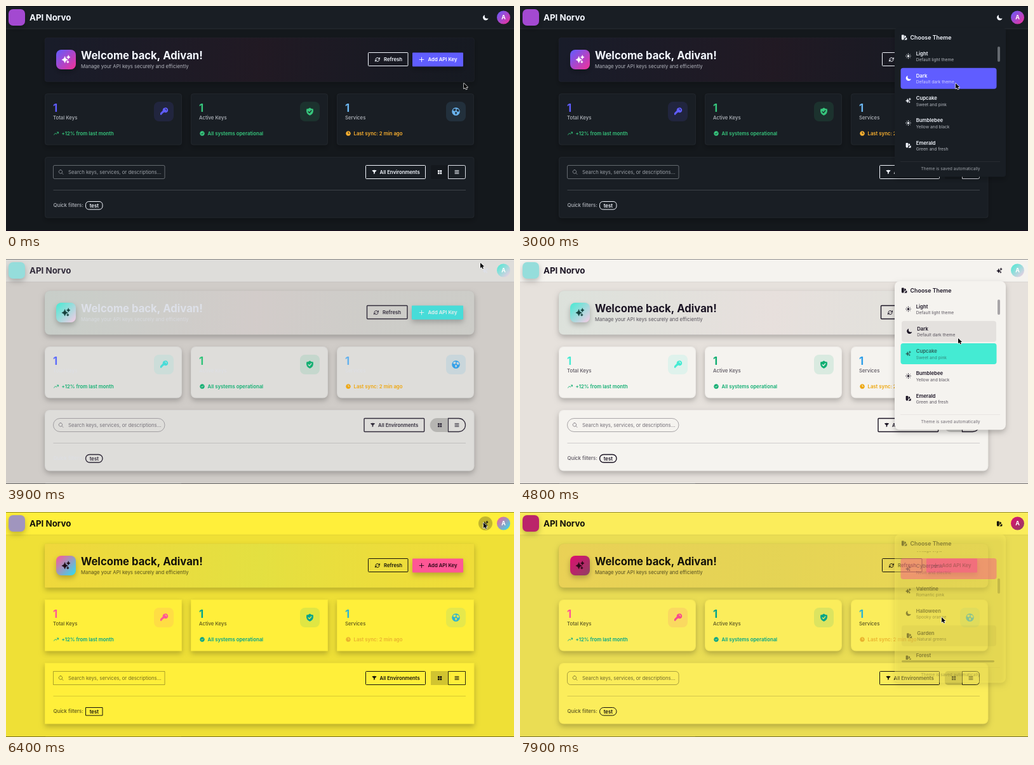
These frames come from a looping animation (800x355 px, 8 s). An HTML page with a canvas:

```html
<!DOCTYPE html>
<html lang="en">
<head>
<meta charset="utf-8">
<title>Key dashboard</title>
<style>
html, body { margin: 0; width: 100%; height: 100%; overflow: hidden; background: #14181c; }
canvas { display: block; width: 800px; height: 355px; }
</style>
</head>
<body>
<canvas id="stage"></canvas>
<script>
const W = 800, H = 355, LOOP = 8000, STEP = 100;
const canvas = document.getElementById('stage');
const dpr = window.devicePixelRatio || 1;
canvas.width = W * dpr;
canvas.height = H * dpr;
const g = canvas.getContext('2d');

// Font sizes: CSS pixels of a 1440 px wide page shown at 800 px
const XS = 12 / 1.8, SM = 14 / 1.8, MD = 16 / 1.8, XL = 24 / 1.8, XXL = 30 / 1.8;

const themes = [
  { start: 0, bg: '14181c', card: '191e24', ink: 'f4f8ff', pri: '605dff', sec: 'f43098', ok: '36c57c',
    info: '6ab4ee', warn: 'fcb12f', onPri: 'ffffff', onTile: 'ffffff', r: 4, field: 2, badge: 5, line: 1, icon: 'moon' },
  { start: 3500, bg: 'e6e1dc', card: 'f5f3ef', ink: '1b1424', pri: '44ebd3', sec: 'f9cbe5', ok: '10ae72',
    info: '2f9fe8', warn: 'eda60c', onPri: '2c5f5a', onTile: '14403c', r: 8, field: 11, badge: 6.5, line: 1.4, icon: 'sparkles' },
  { start: 5600, bg: 'efe036', card: 'ffef3a', ink: '14120a', pri: 'ff5795', sec: '2ce0f0', ok: '00a48c',
    info: '2fb5cf', warn: 'e9b22f', onPri: '2a0616', onTile: '1c0a12', r: 1, field: 0, badge: 0, line: 1, icon: 'sparkles' },
  { start: 7760, bg: 'd4d2d2', card: 'e9e7e7', ink: '100f0f', pri: 'e00d70', sec: '8e4162', ok: '00a87a',
    info: '4fb4d0', warn: 'e9b22f', onPri: 'ffffff', onTile: '2a0816', r: 8, field: 5, badge: 6.5, line: 1, icon: 'swatch' }
];

const menus = [
  { open: 2250, close: 3500, active: 1, scroll: [0, 1, 0] },
  { open: 4450, close: 5600, active: 2, scroll: [4800, 5400, 185] },
  { open: 6600, close: 7760, active: 8, scroll: [6950, 7550, 271] }
];

const options = [
  ['Light', 'Default light theme', 'sun'],
  ['Dark', 'Default dark theme', 'moon'],
  ['Cupcake', 'Sweet and pink', 'sparkles'],
  ['Bumblebee', 'Yellow and black', 'sun'],
  ['Emerald', 'Green and fresh', 'swatch'],
  ['Corporate', 'Professional blue', 'swatch'],
  ['Synthwave', 'Retro neon vibes', 'sparkles'],
  ['Retro', 'Vintage style', 'swatch'],
  ['Cyberpunk', 'Neon and electric', 'sparkles'],
  ['Valentine', 'Romantic pink', 'sparkles'],
  ['Halloween', 'Spooky orange', 'moon'],
  ['Garden', 'Natural greens', 'swatch'],
  ['Forest', 'Deep greens', 'swatch']
];

// Pointer path: time, x, y
const path = [
  [0, 721, 122], [200, 721, 122], [600, 727, 104], [800, 727, 104], [1700, 753, 20], [2250, 753, 20],
  [2600, 705, 80], [3000, 686, 122], [3350, 670, 148], [3500, 670, 148], [3900, 747, 6], [4150, 752, 16],
  [4450, 752, 17], [4800, 690, 125], [5300, 680, 172], [5600, 680, 172], [5700, 684, 132], [6200, 750, 20],
  [6400, 752, 17], [6600, 752, 17], [6900, 690, 120], [7400, 668, 190], [7760, 664, 190], [7900, 664, 166], [8000, 670, 150]
];

// 24-unit icons; s = stroke width, f = filled
const icons = {
  moon: { f: 1, d: 'M9.5 1.7a.75.75 0 0 1 .2.8A9 9 0 0 0 9 6a9 9 0 0 0 9 9 9 9 0 0 0 3.5-.7.75.75 0 0 1 1 1A10.5 10.5 0 1 1 8.7 1.6a.75.75 0 0 1 .8.1Z' },
  sparkles: { f: 1, d: 'M9 4.5Q10 11 16.5 12.5Q10 14 9 20.5Q8 14 1.5 12.5Q8 11 9 4.5M18 1.5Q18.7 5.3 22.5 6Q18.7 6.7 18 10.5Q17.3 6.7 13.5 6Q17.3 5.3 18 1.5M16.5 15Q17 17.5 19.5 18Q17 18.5 16.5 21Q16 18.5 13.5 18Q16 17.5 16.5 15Z', s: 1 },
  sun: { f: 1, s: 2.2, d: 'M12 8.5a3.5 3.5 0 1 0 .01 0M12 2v2.5M12 19.5v2.5M2 12h2.5M19.5 12h2.5M5 5l1.6 1.6M17.4 17.4l1.6 1.6M5 19l1.6-1.6M17.4 6.6l1.6-1.6' },
  swatch: { f: 1, d: 'M2.2 4.1a1.9 1.9 0 0 1 1.9-1.9h5.2a1.9 1.9 0 0 1 1.9 1.9v13.1a4.5 4.5 0 1 1-9 0ZM12.8 20.8l8-8a1.9 1.9 0 0 1 1.7 1.9v5.2a1.9 1.9 0 0 1-1.9 1.9H12ZM12.8 6.2l.8-.8a1.9 1.9 0 0 1 2.6 0l2.6 2.6a1.9 1.9 0 0 1 0 2.6l-6 6Z' },
  shield: { f: 1, d: 'M12 1.5Q16 5 21 5Q23.5 18 12 22.5Q.5 18 3 5Q8 5 12 1.5Z' },
  check: { s: 2.4, d: 'M8 12.5l3 3L16 9.5' },
  key: { f: 1, d: 'M15.7 1.5a6.8 6.8 0 0 0-6.6 8L2.5 16.2V21H6.5V18.5H9V16h2l2-2.1A6.8 6.8 0 1 0 15.7 1.5Z' },
  bow: { s: 1.8, d: 'M15.8 5a3.3 3.3 0 0 1 3.3 3.3' },
  disc: { f: 1, d: 'M12 2a10 10 0 1 0 .01 0Z' },
  land: { f: 1, d: 'M6 5L11 4L12 8L9 11L6 10L4 8ZM14 5L19 6L21 11L17 13L14 10ZM10 13L15 14L14 18L12 20L10 17Z' },
  hands: { s: 2.4, d: 'M12 6.5V12H16' },
  trend: { s: 2.6, d: 'M2 18L9 11L13 15L21.5 7M16 6.5H22V12' },
  refresh: { s: 2.6, d: 'M4 10A8.5 8.5 0 0 1 19 7.5L21 10M21 4V10H15M20 14A8.5 8.5 0 0 1 5 16.5L3 14M3 20V14H9' },
  plus: { s: 2.4, d: 'M12 3V21M3 12H21' },
  funnel: { f: 1, d: 'M2 3.5Q12 1.5 22 3.5V6L14.5 13V18.5L9.5 22V13L2 6Z' },
  grid: { f: 1, d: 'M3 3h8v8H3ZM13.5 3h8v8h-8ZM3 13.5h8v8H3ZM13.5 13.5h8v8h-8Z' },
  list: { s: 2.4, d: 'M3 4.5H21M3 9.5H21M3 14.5H21M3 19.5H21' },
  search: { s: 2, d: 'M10.5 3a7.5 7.5 0 1 0 .01 0M16 16L21.5 21.5' }
};
for (const k in icons) icons[k].p = new Path2D(icons[k].d);
const arrow = new Path2D('M0 0V8.4L2 6.6L3.4 9.6L4.9 8.9L3.6 6.1H6.2Z');

const clamp = v => Math.max(0, Math.min(1, v));
const smooth = v => { v = clamp(v); return v * v * (3 - 2 * v); };
const rgb = hex => [0, 2, 4].map(i => parseInt(hex.substr(i, 2), 16));
const mix = (a, b, p) => a.map((v, i) => v + (b[i] - v) * p);
const col = (c, a = 1) => `rgba(${c.map(Math.round).join()},${a})`;

function box(x, y, w, h, r, fill, stroke, lw = 1) {
  g.beginPath();
  g.roundRect(x, y, w, h, r);
  if (fill) { g.fillStyle = fill; g.fill(); }
  if (stroke) { g.strokeStyle = stroke; g.lineWidth = lw; g.stroke(); }
}

function raised(x, y, w, h, r, fill, edge) {
  g.save();
  g.shadowColor = 'rgba(0,0,0,.24)';
  g.shadowBlur = 9 * dpr;
  g.shadowOffsetY = 4 * dpr;
  box(x, y, w, h, r, fill);
  g.restore();
  if (edge) box(x + .5, y + .5, w - 1, h - 1, r, null, edge, .7);
}

// y is the middle of the capitals
function text(s, x, y, size, weight, fill, align = 'left') {
  g.font = `${weight} ${size}px Inter, sans-serif`;
  g.textAlign = align;
  g.fillStyle = fill;
  g.fillText(s, x, y + size * .364);
}

function icon(name, cx, cy, size, color) {
  const { f, s, p } = icons[name];
  g.save();
  g.translate(cx - size / 2, cy - size / 2);
  g.scale(size / 24, size / 24);
  g.fillStyle = g.strokeStyle = color;
  g.lineCap = g.lineJoin = 'round';
  if (f) g.fill(p);
  if (s) { g.lineWidth = s; g.stroke(p); }
  g.restore();
}

function ramp(x, y, w, h, ...colors) {
  const r = g.createLinearGradient(x, y, x + w, y + h);
  colors.forEach((c, i) => r.addColorStop(i / (colors.length - 1), c));
  return r;
}

function pointer(t) {
  let i = 1;
  while (i < path.length - 1 && path[i][0] < t) i++;
  const a = path[i - 1], b = path[i];
  return mix(a.slice(1), b.slice(1), smooth((t - a[0]) / (b[0] - a[0])));
}

function palette(t) {
  let n = themes.length - 1;
  while (t < themes[n].start) n--;
  const now = themes[n], old = themes[Math.max(0, n - 1)];
  const early = smooth((t - now.start) / 500), late = smooth((t - now.start - 300) / 500);
  const c = { now, dark: n === 0 };
  for (const k of ['bg', 'card', 'ink', 'pri', 'ok', 'info', 'warn', 'onPri']) {
    c[k] = mix(rgb(old[k]), rgb(now[k]), early);
    c[k + 'Late'] = mix(rgb(old[k]), rgb(now[k]), late);
  }
  c.from = rgb(now.pri);
  c.to = rgb(now.sec);
  return c;
}

function header(c, hover) {
  box(0, 0, W, 36, 0, col(c.card));
  box(0, 35.5, W, 1, 0, col(c.ink, .08));
  raised(4, 5, 26, 26, 7, col(mix(c.from, c.to, .45)));
  text('API Norvo', 37, 18, XL, 700, col(c.ink));
  if (hover) box(744, 7, 22, 22, 11, col(c.ink, .26));
  icon(c.now.icon, 755, 18.5, 10, col(c.inkLate));
  box(773, 7.5, 21, 21, 10.5, ramp(773, 7.5, 21, 21, col(c.from), col(c.to)));
  text('A', 783.5, 18, MD, 700, '#fff', 'center');
}

function outline(c, x, y, w) {
  box(x + .5, y + .5, w - 1, 21, 1, null, col(c.ink), c.now.line);
}

function hero(c) {
  const { r, onTile, line } = c.now, wide = line > 1 ? 2 : 0;
  raised(61, 50, 676.5, 69.5, r, col(c.bg));
  box(61, 50, 676.5, 69.5, r, ramp(61, 50, 676, 69, col(c.from, .06), col(c.to, .06), col(c.from, .025)), col(c.ink, .05), .6);
  raised(79, 69, 31, 31, 8, ramp(79, 69, 31, 31, col(c.from), col(c.to)));
  icon('sparkles', 94.5, 84.5, 15, '#' + onTile);
  text('Welcome back, Adivan!', 118, 77.5, XXL, 700, col(c.inkLate));
  text('Manage your API keys securely and efficiently', 118, 95.5, SM, 400, col(c.inkLate, .7));
  outline(c, 570 - wide, 73, 63.5 + wide / 2);
  icon('refresh', 585 - wide, 84.5, 9, col(c.ink));
  text('Refresh', 595 - wide, 84.5, SM, 600, col(c.ink));
  raised(640 - wide / 2, 73.5, 80 + wide / 2, 22, 1, col(c.pri));
  icon('plus', 654.5, 84.5, 9, col(c.onPriLate));
  text('Add API Key', 664.5, 84.5, SM, 600, col(c.onPriLate));
}

function stat(c, x, label, tint, numTint, note, noteTint, noteIcon) {
  raised(x, 138, 216, 81.5, c.now.r, col(c.card), col(c.ink, .05));
  text('1', x + 13, 160.5, XXL, 700, col(numTint));
  text(label, x + 13, 176, SM, 500, col(c.inkLate, .7));
  box(x + 172, 151, 31, 31, 8, col(tint, .12));
  const hole = col(mix(c.card, tint, .12)), ix = x + 187.5, iy = 166.5;
  if (label === 'Total Keys') {
    icon('key', ix, iy, 14, col(tint));
    icon('bow', ix, iy, 14, hole);
  } else if (label === 'Active Keys') {
    icon('shield', ix, iy, 14, col(tint));
    icon('check', ix, iy, 14, hole);
  } else {
    icon('disc', ix, iy, 15, col(tint));
    icon('land', ix, iy, 14, hole);
  }
  const mark = { check: 1, hands: 1 }[noteIcon];
  if (mark) icon('disc', x + 18, 201, 9, col(noteTint));
  icon(noteIcon, x + 18, 201, mark ? 9 : 8.5, mark ? col(c.card) : col(noteTint));
  text(note, x + 26.5, 200.7, SM, 600, col(noteTint));
}

function filters(c) {
  const { r, field, badge, line } = c.now, wide = line > 1 ? 2.5 : 0;
  raised(61, 238, 676.5, 96.5, r, col(c.card), col(c.ink, .05));
  box(74.5, 251.5, 175.5, 21, field, null, col(c.ink, .35), 1);
  icon('search', 86.5, 262, 9, col(c.ink, .6));
  text('Search keys, services, or descriptions...', 98, 262, SM, 400, col(c.ink, .6));
  outline(c, 566 - wide, 251, 95 + wide / 4);
  icon('funnel', 580 - wide, 262, 8, col(c.ink));
  text('All Environments', 588.5 - wide, 262, SM, 600, col(c.ink));
  box(669 - wide / 2, 251, 27.5 + wide / 2, 22, [field, 0, 0, field], 'rgba(0,0,0,.18)');
  icon('grid', 683, 262, 8, col(c.ink));
  box(696.5, 251.5, 27, 21, [0, field, field, 0], null, col(c.ink), line * .9);
  icon('list', 710, 262, 8, col(c.ink));
  box(74.5, 290, 649.5, 1, 0, col(c.ink, .17));
  text('Quick filters:', 74.5, 313.8, SM, 500, col(c.inkLate, .7));
  box(125.5, 308.5, 26.5, 12.5, badge, null, col(c.ink), line);
  text('test', 138.8, 314.8, SM, 600, col(c.ink), 'center');
}

function menu(c, m, t) {
  const alpha = Math.min(smooth((t - m.open) / 200), 1 - clamp((t - m.close) / 250));
  if (alpha <= 0) return;
  const [s0, s1, dist] = m.scroll;
  const scroll = dist * smooth((t - s0) / (s1 - s0));
  const [mx, my] = pointer(Math.min(t, m.close));
  const over = mx > 599 && mx < 750 && my > 62 && my < 233 ? Math.floor((my + scroll - 62) / 35.2) : -1;
  g.save();
  g.globalAlpha = alpha;
  raised(590, 35, 175, 234.5, c.now.r, col(c.card));
  icon('swatch', 605, 49.5, 10, col(c.ink));
  text('Choose Theme', 614.5, 49.5, MD, 600, col(c.ink));
  g.save();
  g.beginPath();
  g.rect(596, 62, 156, 171);
  g.clip();
  options.forEach(([name, note, pic], i) => {
    const y = 79 + 35.2 * i - scroll, on = i === m.active;
    if (y < 40 || y > 255) return;
    if (on) box(599.5, y - 16.5, 151, 33, 4, col(c.pri));
    else if (i === over) box(601, y - 16.5, 149, 33, 4, col(c.ink, .08));
    const shift = i === over && !on ? 1.5 : 0, ink = on ? c.onPri : c.ink;
    icon(pic, 611.5 + shift, y, 9.5, col(ink));
    text(name, 623.7 + shift, y - 4, SM, 600, col(ink));
    text(note, 623.7 + shift, y + 5.8, XS, 400, col(ink, .7));
  });
  g.restore();
  box(752, 64 + scroll * .15, 4, 24, 2, col(c.ink, .35));
  if (scroll > 0) box(601, 234, 146, 3.2, 1.6, col(c.ink, .42));
  box(599, 245, 157, .8, 0, col(c.ink, .08));
  text('Theme is saved automatically', 678, 256.5, XS, 400, col(c.ink, .6), 'center');
  g.restore();
}

function draw(t) {
  const c = palette(t), [px, py] = pointer(t);
  const open = menus.some(m => t > m.open && t < m.close);
  g.setTransform(dpr, 0, 0, dpr, 0, 0);
  box(0, 0, W, H, 0, col(c.bg));
  hero(c);
  stat(c, 61, 'Total Keys', c.pri, c.priLate, '+12% from last month', c.ok, 'trend');
  stat(c, 291, 'Active Keys', c.ok, c.okLate, 'All systems operational', c.ok, 'check');
  stat(c, 521, 'Services', c.info, c.infoLate, 'Last sync: 2 min ago', c.warn, 'hands');
  filters(c);
  if (!c.dark) box(61, 353, 216, 4, 2, col(c.card), col(c.ink, .08), .6);
  header(c, !c.dark && !open && Math.hypot(px - 755, py - 18) < 10);
  menus.forEach(m => menu(c, m, t));
  box(0, 0, W, .8, 0, 'rgba(0,0,0,.55)');
  box(0, 354, W, 1, 0, c.dark ? '#1a0a20' : 'rgba(0,0,0,.5)');
  g.save();
  g.translate(px, py);
  g.lineWidth = 1.3;
  g.lineJoin = 'round';
  g.strokeStyle = '#fff';
  g.stroke(arrow);
  g.fillStyle = '#000';
  g.fill(arrow);
  g.restore();
}

const began = performance.now();
function tick() {
  const t = (performance.now() - began) % LOOP;
  draw(Math.floor(t / STEP) * STEP);
  requestAnimationFrame(tick);
}
tick();
</script>
</body>
</html>
```
